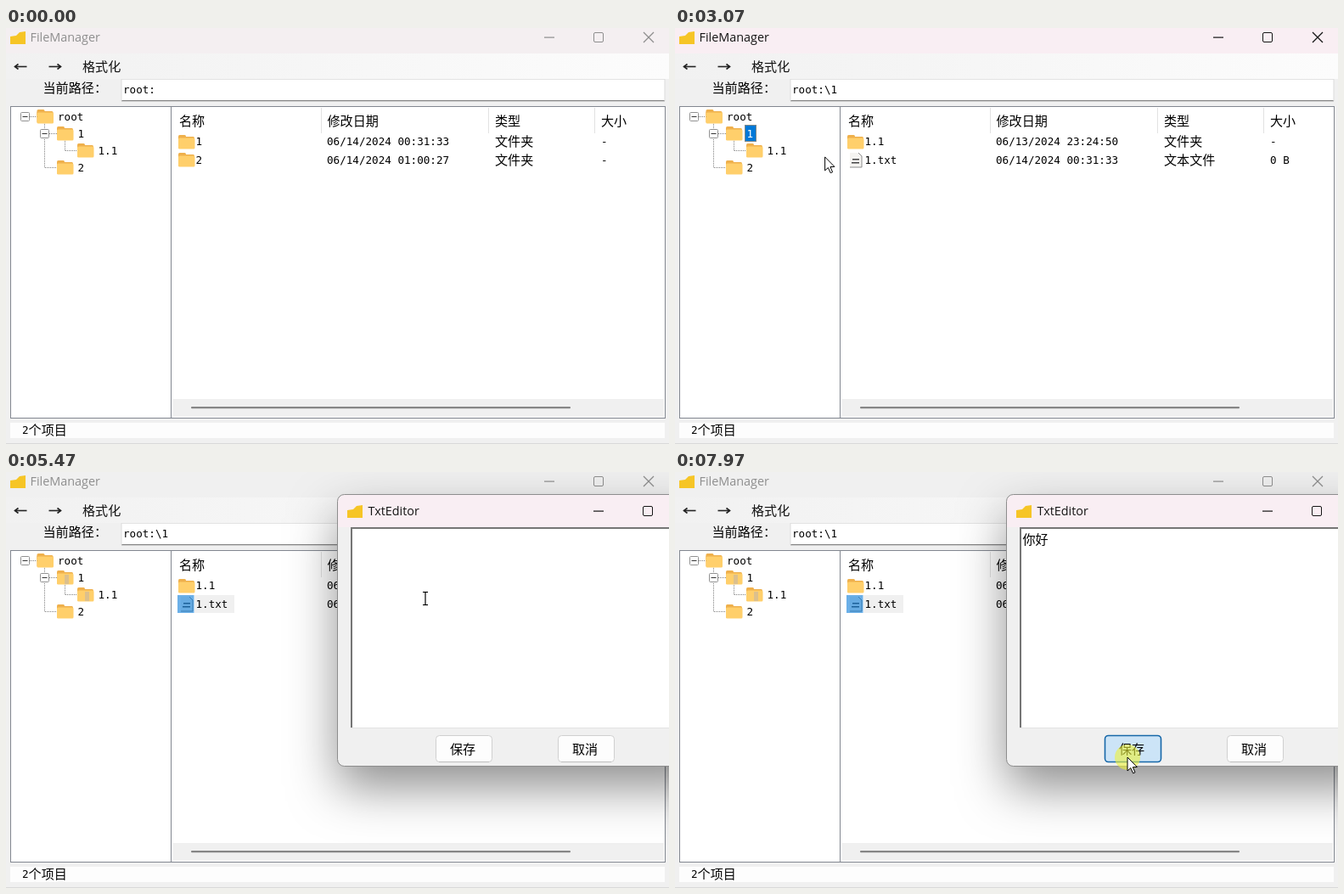
These frames come from a looping animation (781x490 px, 8 s). An HTML page with a canvas:

```html
<!DOCTYPE html>
<html lang="zh">
<head>
<meta charset="utf-8">
<title>FileManager</title>
<style>
html, body { margin: 0; width: 100%; height: 100%; overflow: hidden; background: #f0f0f0; }
canvas { display: block; width: 781px; height: 490px; }
</style>
</head>
<body>
<canvas id="stage" width="781" height="490"></canvas>
<script>
const ctx = document.getElementById('stage').getContext('2d');
const LOOP = 8000;
const MONO = '12.6px "DejaVu Sans Mono", monospace';
const CJK = '15.1px "Noto Sans CJK SC", "Noto Sans CJK", sans-serif';
const UI = '14.4px "Open Sans", "Noto Sans", sans-serif';
const BLUE = '#0078d7';
const FADED = '#8e8e8e';

// Stop lists: [time, ...values]
const cursorStops = [
  [140, 300, 455], [820, 161, 149], [1630, 90, 125], [2380, 90, 125],
  [2730, 145, 144], [2930, 145, 144], [3130, 185, 154], [3560, 241, 134],
  [3960, 241, 134], [4180, 250.5, 158], [4260, 250.5, 158], [4450, 250.5, 154],
  [4850, 250.5, 154], [5440, 494, 149], [5480, 494, 149], [5540, 498.5, 146.5]
];
const saveStops = [[7350, 497, 145], [7860, 533, 336]];
const mainTint = [[0, .5], [600, 0], [1770, 0], [1840, .4], [2300, 1], [4780, 1], [4850, .4], [5250, 0]];
const dialogTint = [[4780, .1], [4850, .3], [5400, 1]];
const dialogScale = [[4780, .925], [4850, .965], [4920, .99], [4990, 1]];
const clicks = [[1700, 1800], [3620, 3760], [4430, 4510], [4600, 4700], [7920, 8000]];

const between = (t, a, b) => t >= a && t < b;
const ease = k => k * k * (3 - 2 * k);

function sample(stops, t, curve = k => k) {
  if (t <= stops[0][0]) return stops[0].slice(1);
  for (let i = 1; i < stops.length; i++) {
    const [a, ...from] = stops[i - 1], [b, ...to] = stops[i];
    if (t < b) {
      const k = curve((t - a) / (b - a));
      return from.map((v, j) => v + (to[j] - v) * k);
    }
  }
  return stops[stops.length - 1].slice(1);
}

const titleColor = k => `rgb(${240 + 9 * k},${240 - 2 * k},${240 + 3 * k})`;

function rect(x, y, w, h, color) {
  ctx.fillStyle = color;
  ctx.fillRect(x, y, w, h);
}

function roundRect(x, y, w, h, r, fill, stroke, width = 1) {
  ctx.beginPath();
  ctx.roundRect(x, y, w, h, r);
  if (fill) { ctx.fillStyle = fill; ctx.fill(); }
  if (stroke) { ctx.strokeStyle = stroke; ctx.lineWidth = width; ctx.stroke(); }
}

function path(points, { fill, stroke, width = 1, close = false, dash = [] }) {
  ctx.beginPath();
  points.forEach(([x, y]) => ctx.lineTo(x, y));
  if (close) ctx.closePath();
  if (fill) { ctx.fillStyle = fill; ctx.fill(); }
  if (stroke) {
    ctx.strokeStyle = stroke;
    ctx.lineWidth = width;
    ctx.setLineDash(dash);
    ctx.stroke();
    ctx.setLineDash([]);
  }
}

// Text centred on cy; Latin runs are monospaced, Chinese runs are full width.
function label(s, x, cy, color = '#000') {
  ctx.fillStyle = color;
  for (const run of s.match(/[\x20-\x7e]+|[^\x20-\x7e]+/g)) {
    const latin = run.charCodeAt(0) < 127;
    ctx.font = latin ? MONO : CJK;
    ctx.fillText(run, x, cy + (latin ? 4.5 : 5.5));
    x += ctx.measureText(run).width;
  }
}

function uiText(s, x, baseline, color) {
  ctx.font = UI;
  ctx.fillStyle = color;
  ctx.fillText(s, x, baseline);
}

function folder(x, y, visited = false) {
  roundRect(x, y, 9, 8, 1.5, '#efb04c');
  roundRect(x, y + 2, 19, 14, 1.5, '#efb04c');
  roundRect(x, y + 3.5, 19.5, 13, 1.5, '#ffcf6b');
  if (visited) rect(x + 9, y + 5, 5, 11, '#dcc08d');
}

function appIcon(x, y) {
  path([[x, y + 6], [x + 7, y + 5], [x + 11, y + 1], [x + 18, y], [x + 18, y + 15], [x, y + 15]],
    { fill: '#f6c526', close: true });
}

function textFile(x, y) {
  path([[x, y], [x + 10, y], [x + 14, y + 4], [x + 14, y + 17], [x, y + 17]], { fill: '#f5f4f1', close: true });
  path([[x + 10, y], [x + 14, y + 4], [x + 14, y + 17], [x, y + 17]], { stroke: '#8b8b8b' });
  rect(x + 3, y + 7, 8, 1.5, '#444');
  rect(x + 2, y + 11, 9, 1.5, '#444');
}

function windowButtons(minX, y, color) {
  rect(minX, y, 12, 1.2, color);
  roundRect(minX + 58.5, y - 5, 11, 11, 1.5, null, color);
  const x = minX + 117;
  path([[x, y - 5.5], [x + 12, y + 6.5]], { stroke: color, width: 1.2 });
  path([[x + 12, y - 5.5], [x, y + 6.5]], { stroke: color, width: 1.2 });
}

function toolArrow(x, dir) {
  path([[x - 7 * dir, 45.5], [x + 7 * dir, 45.5]], { stroke: '#222', width: 1.6 });
  path([[x + 3 * dir, 42.5], [x + 7 * dir, 45.5], [x + 3 * dir, 48.5]], { stroke: '#222', width: 1.6 });
}

function expander(x, y) {
  rect(x - 5.5, y - 5.5, 11, 11, '#fff');
  roundRect(x - 5, y - 5, 10, 10, 1, null, '#919191');
  rect(x - 3, y - .5, 6, 1, '#333');
}

function selectedLabel(x, y, w, h) {
  rect(x, y, w, h, BLUE);
  ctx.strokeStyle = '#ff9a3c';
  ctx.lineWidth = 1;
  ctx.setLineDash([1, 1]);
  ctx.strokeRect(x + .5, y + .5, w - 1, h - 1);
  ctx.setLineDash([]);
}

function drawTree(t) {
  const dots = { stroke: '#808080', dash: [1, 1] };
  path([[28, 104.5], [37, 104.5]], dots);
  path([[45.5, 113], [45.5, 164.5], [60, 164.5]], dots);
  path([[51, 124.5], [60, 124.5]], dots);
  path([[69.5, 133], [69.5, 144.5], [84, 144.5]], dots);
  expander(22.5, 104.5);
  expander(45.5, 124.5);
  const visited = t >= 3620;
  folder(36.5, 96);
  folder(60, 116, visited);
  folder(84, 136, visited);
  folder(60, 156);
  const selected = between(t, 1770, 3620);
  if (selected) selectedLabel(82, 114, 14, 20);
  label('root', 61, 104);
  label('1', 84.5, 124, selected ? '#fff' : '#000');
  label('1.1', 108.5, 144);
  label('2', 84.5, 164);
}

function drawRow(y, name, date, type, size) {
  label(name, 223.5, y);
  label(date, 378, y);
  label(type, 576, y);
  label(size, 701, y);
}

function drawList(t) {
  label('名称', 204, 109);
  label('修改日期', 378.5, 109);
  label('类型', 576, 109);
  label('大小', 701, 109);
  for (const x of [371, 568, 693]) rect(x, 94, 1, 30, '#e2e2e2');

  folder(203, 126);
  if (t < 1770) {
    folder(203, 147);
    drawRow(133.5, '1', '06/14/2024 00:31:33', '文件夹', '-');
    drawRow(155, '2', '06/14/2024 01:00:27', '文件夹', '-');
    return;
  }
  textFile(206, 147);
  const fileSelected = t >= 4500;
  if (fileSelected && t >= 4780) rect(222, 145, 47, 21, '#f0f0f0');
  drawRow(133.5, '1.1', '06/13/2024 23:24:50', '文件夹', '-');
  drawRow(155, '1.txt', '06/14/2024 00:31:33', '文本文件', '0 B');
  if (between(t, 3690, 4500)) {
    rect(202, 124, 20, 21, 'rgba(0,120,215,.5)');
    selectedLabel(222, 124, 32, 21);
    label('1.1', 223.5, 133.5, '#fff');
  }
  if (fileSelected) {
    rect(202, 145, 19.5, 21, 'rgba(0,120,215,.58)');
    if (t < 4780) {
      selectedLabel(222, 145, 47, 21);
      label('1.txt', 223.5, 155, '#fff');
    }
  }
}

function drawMain(t) {
  rect(0, 0, 781, 490, '#f0f0f0');
  rect(0, 0, 781, 30, titleColor(sample(mainTint, t)[0]));
  const bar = ctx.createLinearGradient(0, 0, 781, 0);
  bar.addColorStop(0, '#f1f1f1');
  bar.addColorStop(1, '#fcfcfc');
  rect(0, 30, 781, 30, bar);

  const ink = between(t, 1770, 4780) ? '#151515' : FADED;
  appIcon(5, 4);
  uiText('FileManager', 28.5, 16, ink);
  windowButtons(634, 10.5, ink);
  toolArrow(17.5, -1);
  toolArrow(57.5, 1);
  label('格式化', 90, 45.5, '#111');

  label('当前路径：', 43.5, 70.5);
  rect(136, 60, 640, 26, '#fff');
  rect(136, 60, 640, 1, '#e3e3e3');
  rect(136, 85, 640, 1.3, '#868686');
  rect(135.5, 60, 1, 26, '#dcdcdc');
  rect(775.5, 60, 1, 26, '#dcdcdc');
  label(t < 1770 ? 'root:' : 'root:\\1', 138, 72);

  rect(5, 92, 772, 368, '#828790');
  rect(6, 93, 188, 366, '#fff');
  rect(195, 93, 581, 366, '#fff');
  rect(197, 437, 578, 21, '#f0f0f0');
  roundRect(218, 446, 447, 2.2, 1, '#868686');
  rect(5, 465, 771, 18, '#fdfdfd');
  rect(0, 489, 781, 1, '#d9d9d9');
  label('2个项目', 19, 473);

  drawTree(t);
  drawList(t);
}

function pushButton(s, x, hot) {
  roundRect(x + .5, 310.5, 66, 31, 4, hot ? '#cce4f7' : '#fdfdfd', hot ? '#1667a8' : '#d0d0d0', hot ? 1.6 : 1);
  if (!hot) rect(x + 4, 341, 59, 1, '#bdbdbd');
  label(s, x + 17, 326);
}

function drawInput(t) {
  const letters = ['n', 'ni', "ni'h", "ni'ha", "ni'hao"];
  const step = [6070, 6140, 6470, 6540, 6620].filter(at => t >= at).length;
  let caretX = 410, caretOn = between(t, 4780, 5340) || between(t, 5870, 6820);
  if (t >= 6820) {
    label('你好', 409.5, 79);
    caretX = 440;
    caretOn = t < 7350;
  } else if (step) {
    const typed = letters[step - 1];
    label(typed, 409.5, 79);
    ctx.font = MONO;
    caretX = 410 + ctx.measureText(typed).width;
    path([[410, 87.5], [caretX, 87.5]], { stroke: '#000', dash: [1, 1] });
    drawCandidates(step > 2 ? ['你好', '你', '呢', '尼', '泥', '拟', '逆'] : ['你', '能', '那', '年', '呢', '内', '哪']);
  }
  if (caretOn) rect(caretX, 69, 1.3, 20, '#000');
}

function drawCandidates(words) {
  roundRect(423.5, 98.5, 400, 47, 7, '#fafafa', '#d0d0d0');
  roundRect(429, 104, 62, 36, 4, '#ebebeb');
  rect(429, 114, 3, 16, BLUE);
  let x = 438;
  words.forEach((word, i) => {
    label(`${i + 1} `, x, 122, '#777');
    label(word, x + 16, 122);
    x += 36 + 15 * word.length;
  });
}

function drawDialog(t, hot) {
  if (t < 4780) return;
  const [scale] = sample(dialogScale, t);
  const open = (1 - scale) / .035;
  ctx.save();
  ctx.globalAlpha = Math.min(1, .75 + (t - 4780) / 280);
  ctx.translate(391 + 3.5 * open, 27 + 3 * open);
  ctx.scale(scale, scale);
  ctx.translate(-391, -27);

  ctx.save();
  ctx.shadowColor = 'rgba(0,0,0,.44)';
  ctx.shadowBlur = 56;
  ctx.shadowOffsetY = 25;
  roundRect(391, 27, 441, 319.5, 8, '#f0f0f0');
  ctx.restore();
  roundRect(391, 27, 441, 38, [8, 8, 0, 0], titleColor(sample(dialogTint, t)[0]));
  roundRect(390.5, 26.5, 442, 320, 8, null, '#8d8d8d');

  appIcon(402, 39);
  uiText('TxtEditor', 426.5, 51, '#151515');
  windowButtons(692, 45.5, '#151515');
  rect(406, 65, 412, 237, '#e3e3e3');
  rect(406, 65, 411, 236, '#757575');
  rect(408, 67, 409, 234, '#fff');
  pushButton('保存', 506, hot);
  pushButton('取消', 650, false);
  drawInput(t);
  ctx.restore();
}

function drawCursor(t, x, y) {
  if (t < 140 || between(t, 5610, 6140)) return;
  if (clicks.some(([a, b]) => between(t, a, b))) {
    ctx.beginPath();
    ctx.arc(x, y, 15, 0, 7);
    ctx.fillStyle = 'rgba(236,242,56,.6)';
    ctx.fill();
  }
  if (t < 5610 && x > 408) {
    const beam = { stroke: '#000', width: 1.2 };
    path([[x, y - 7.5], [x, y + 7.5]], beam);
    path([[x - 3, y - 7.5], [x + 3, y - 7.5]], beam);
    path([[x - 3, y + 7.5], [x + 3, y + 7.5]], beam);
    return;
  }
  const arrow = [[0, 0], [0, 16], [3.8, 12.6], [6.6, 18.8], [9, 17.8], [6.3, 11.7], [11.3, 11.5]];
  path(arrow.map(([dx, dy]) => [x + dx, y + dy]), { fill: '#fff', stroke: '#000', close: true });
}

function frame(now) {
  const t = now % LOOP;
  const [x, y] = sample(t < 6140 ? cursorStops : saveStops, t, ease);
  drawMain(t);
  drawDialog(t, t > 7350 && y > 310);
  drawCursor(t, x, y);
  requestAnimationFrame(frame);
}
requestAnimationFrame(frame);
</script>
</body>
</html>
```
